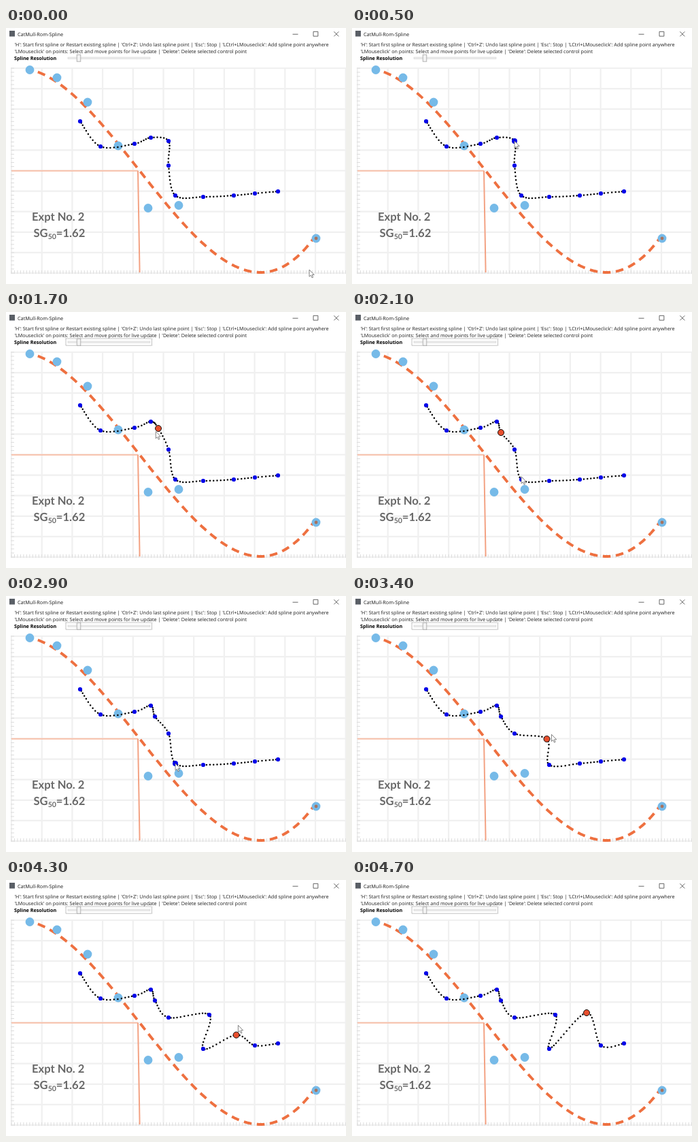
An HTML page that plays this animation: 500 px wide and 376 px high, repeating every 5300 ms.

```html
<!DOCTYPE html>
<html lang="en">
<head>
<meta charset="utf-8">
<title>CatMull-Rom-Spline</title>
<style>
  html, body { margin: 0; width: 100%; height: 100%; overflow: hidden; background: #fff; }
  svg { display: block; width: 500px; height: 376px; }
  text { font-family: "Open Sans", "Noto Sans", sans-serif; font-size: 7.2px; fill: #1c1c1c; text-rendering: geometricPrecision; white-space: pre; }
  .bold { font-weight: 700; fill: #000; }
  .note { font-family: Lato, "Open Sans", sans-serif; font-size: 16.6px; font-weight: 700; fill: #686868; }
  .sub { font-size: 10.5px; }
  .soft { filter: blur(.7px); }
  .line { fill: none; }
</style>
</head>
<body>
<svg viewBox="0 0 500 376">
  <rect x="5" y="4" width="8" height="8.5" fill="#5a5f66"/>
  <text x="17" y="12" style="font-size:7.3px">CatMull-Rom-Spline</text>
  <path class="line" stroke="#555" stroke-width=".9" d="M421.5 9.2h8M452 5.3h6.8v6.8h-6.8zM482.3 5.3l7 7m0-7l-7 7"/>
  <text x="12.5" y="26.5">'H': Start first spline or Restart existing spline | 'Ctrl+Z': Undo last spline point | 'Esc': Stop | 'LCtrl+LMouseclick': Add spline point anywhere</text>
  <text x="12.5" y="36.9">'LMouseclick' on points: Select and move points for live update | 'Delete': Delete selected control point</text>
  <text class="bold" x="12" y="47.1">Spline Resolution</text>

  <rect x="91" y="43" width="121" height="2.2" fill="#ececec" stroke="#d2d2d2" stroke-width=".6"/>
  <rect id="focus" class="line" x="88" y="39" width="126.5" height="10.2" stroke="#555" stroke-width=".7" stroke-dasharray="1 1"/>
  <rect x="104.2" y="39.2" width="5.6" height="10" fill="#f3f3f3" stroke="#a3a3a3" stroke-width=".8"/>

  <g class="soft">
    <path id="grid" class="line" stroke="#f0f0f0" stroke-width="2.2"/>
    <path id="ticks" class="line" stroke="#dcdcdc" stroke-width="1"/>
    <path class="line" stroke="#f8c0aa" stroke-width="2" d="M8 209.8H194"/>
    <path class="line" stroke="#f3a283" stroke-width="2" d="M194 209.8L196.6 359"/>
    <path id="trend" class="line" stroke="#ee7040" stroke-width="3.9" stroke-dasharray="11.5 7.8"/>
    <g id="marks"></g>
    <circle cx="456" cy="309" r="2.4" fill="#a8735f"/>
    <text class="note" x="38" y="283.3">Expt No. 2</text>
    <text class="note" x="40.5" y="306.5">SG<tspan class="sub" dy="3.5">50</tspan><tspan dy="-3.5">=1.62</tspan></text>
  </g>

  <path id="dots" class="line" stroke="#000" stroke-width="2.5" stroke-linecap="round"/>
  <g id="knots"></g>
  <path id="cursor" fill="#fff" stroke="#666" stroke-width=".8" stroke-linejoin="round" d="M0 0V10.2L2.3 8.1L4 11.8L5.6 11.1L4 7.5H7.2Z"/>
</svg>
<script>
const LOOP = 5300, STEP = 100, LAG = 100;
const $ = id => document.getElementById(id);

const base = [[109, 137], [139, 174], [189, 170], [213, 161], [239, 166], [239, 202],
              [249, 246], [290, 248], [335, 246], [366, 243], [400, 240]];

// Pointer stops: time, x, y
const stops = [[200, 446, 355], [500, 239, 166], [700, 239, 166], [900, 314, 138], [1400, 238, 166],
               [1600, 224, 171], [1800, 219, 177], [2200, 251, 246], [3000, 249, 246],
               [3600, 299, 198], [4100, 335, 246], [4600, 345, 195]];

// A grabbed knot trails the pointer and stays selected until "end"
const drags = [
  { knot: 4, grab: 600, drop: 1800, end: 2500 },
  { knot: 6, grab: 3000, drop: 3600, end: 4000 },
  { knot: 8, grab: 4100, drop: 4600, end: LOOP }
];

const easeOut = k => 1 - (1 - k) ** 2;

function pointer(t) {
  const i = stops.findIndex(s => s[0] > t);
  if (i < 0) return stops[stops.length - 1].slice(1);
  if (i === 0) return stops[0].slice(1);
  const a = stops[i - 1], b = stops[i], k = easeOut((t - a[0]) / (b[0] - a[0]));
  return [1, 2].map(j => a[j] + (b[j] - a[j]) * k);
}

// Uniform Catmull-Rom with repeated end points
function spline(pts) {
  const out = [], last = pts.length - 1;
  for (let i = 0; i < last; i++) {
    const a = pts[Math.max(i - 1, 0)], b = pts[i], c = pts[i + 1], d = pts[Math.min(i + 2, last)];
    const n = Math.max(6, Math.round(Math.hypot(c[0] - b[0], c[1] - b[1]) / 4.8));
    for (let k = 0; k < n; k++) {
      const u = k / n;
      out.push([0, 1].map(j => b[j] + .5 * u * (c[j] - a[j] +
        u * (2 * a[j] - 5 * b[j] + 4 * c[j] - d[j] + u * (3 * b[j] - a[j] - 3 * c[j] + d[j])))));
    }
  }
  return out.concat([pts[last]]);
}

function setAttrs(el, attrs) {
  for (const [k, v] of Object.entries(attrs)) el.setAttribute(k, v);
}

function addCircle(parent, [cx, cy], r, fill) {
  const c = document.createElementNS('http://www.w3.org/2000/svg', 'circle');
  setAttrs(c, { cx, cy, r, fill });
  parent.append(c);
  return c;
}

function buildChart() {
  let grid = '', ticks = '', trend = '';
  for (let x = 8; x < 500; x += 44.7) grid += `M${x} 58V360`;
  for (let y = 59; y < 365; y += 30.1) grid += `M8 ${y}H500`;
  for (let x = 8; x < 500; x += 4.47) ticks += `M${x} 356V361`;
  for (let y = 59; y < 361; y += 6.02) ticks += `M7 ${y}h5`;
  // Cubic with its lowest point at x = 374
  for (let x = 456; x >= 40; x -= 4) {
    const u = (x - 196) / 178;
    trend += `${trend ? 'L' : 'M'}${x} ${209 + 75 * u * (3 - u * u)}`;
  }
  $('grid').setAttribute('d', grid);
  $('ticks').setAttribute('d', ticks);
  $('trend').setAttribute('d', trend);
  for (const p of [[35, 61.5], [75, 73], [120, 109], [165, 173], [209, 264.5], [254, 260.5], [456, 309]])
    addCircle($('marks'), p, 6.4, '#76bae8');
}

const knots = base.map(p => addCircle($('knots'), p, 3.1, '#0000e8'));

function draw(t) {
  const pts = base.slice();
  for (const d of drags)
    if (t >= d.grab + LAG) pts[d.knot] = pointer(Math.min(t - LAG, d.drop));
  const drag = drags.find(d => t >= d.grab - LAG && t < d.end);

  knots.forEach((c, i) => {
    const held = drag && drag.knot === i;
    const on = held && t >= drag.grab + LAG;
    setAttrs(c, {
      cx: pts[i][0], cy: pts[i][1],
      r: on ? 4.5 : held ? 4 : 3.1,
      fill: on ? '#e84f2e' : '#0000e8',
      stroke: on ? '#111' : 'none'
    });
  });
  $('dots').setAttribute('d', spline(pts).map(p => `M${p[0]} ${p[1]}h0`).join(''));
  $('cursor').setAttribute('transform', `translate(${pointer(t)})`);
  $('cursor').style.display = t < 4700 ? '' : 'none';
  $('focus').style.display = t < 700 ? 'none' : '';
}

buildChart();
const start = performance.now();
function tick() {
  const t = (performance.now() - start) % LOOP;
  draw(Math.floor(t / STEP) * STEP);
  requestAnimationFrame(tick);
}
tick();
</script>
</body>
</html>
```
